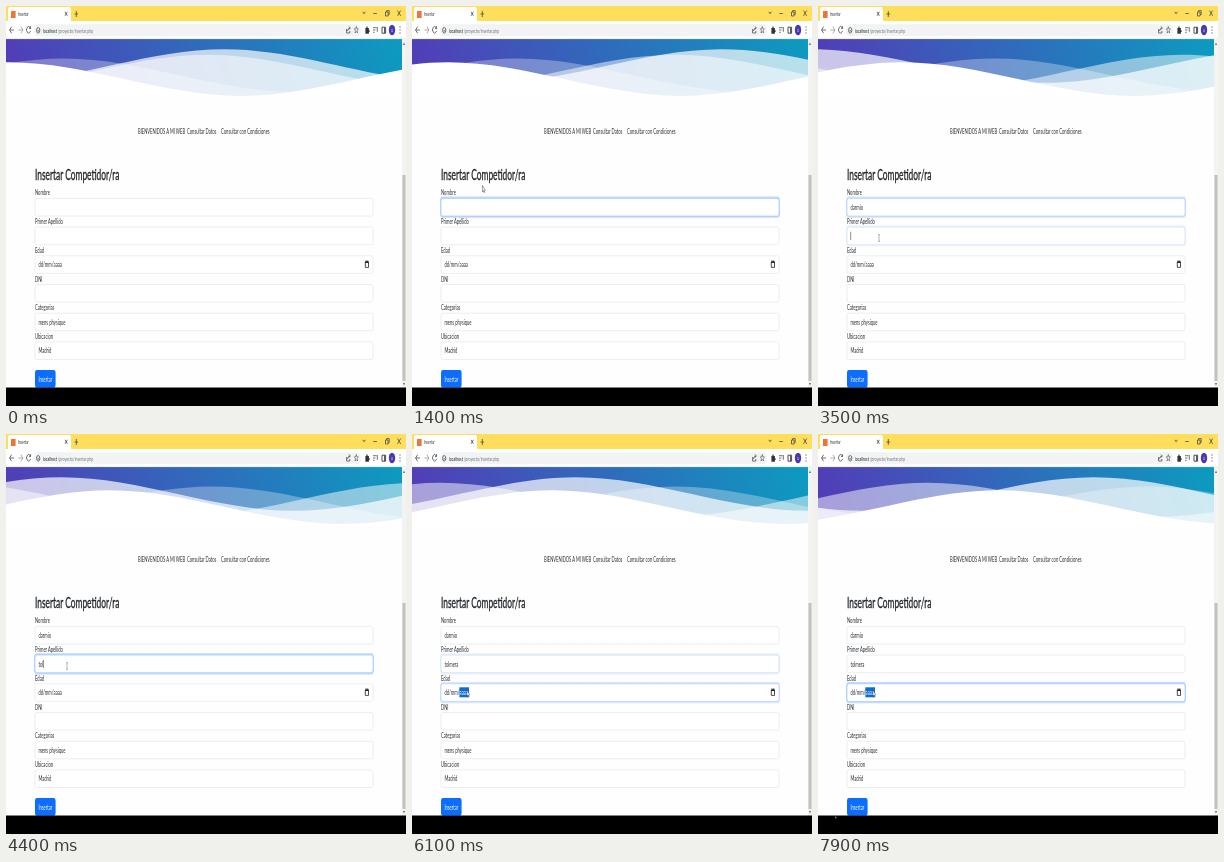
Write an HTML page that moves like this. It is 400 px wide and 400 px high and loops after 8000 ms.

```html
<!DOCTYPE html>
<html lang="es">
<head>
<meta charset="utf-8">
<title>Insertar</title>
<style>
  html, body { margin: 0; width: 100%; height: 100%; overflow: hidden; background: #fefefe; }
  #stage { display: block; width: 100vw; height: 100vh; }
  text { font-family: Lato, "Open Sans", sans-serif; white-space: pre; }
  .icon { fill: none; stroke: #4a4d51; stroke-width: .8; }
</style>
</head>
<body>
<svg id="stage" viewBox="0 0 400 400" preserveAspectRatio="none">
  <defs>
    <linearGradient id="sky" gradientUnits="userSpaceOnUse" x1="0" y1="126" x2="1401" y2="-683">
      <stop stop-color="#543ab7"/><stop offset="1" stop-color="#00acc1"/>
    </linearGradient>
    <path id="wave" d="M-160 44c30 0 58-18 88-18s58 18 88 18 58-18 88-18 58 18 88 18v44h-352z"/>
  </defs>
  <rect width="400" height="400" fill="#fefefe"/>

  <!-- header with waves -->
  <rect transform="translate(0 33) scale(.2604 .463)" width="1521" height="125" fill="url(#sky)"/>
  <svg x="0" y="39.5" width="396" height="52.3" viewBox="0 24 150 28" preserveAspectRatio="none" id="waves"></svg>

  <!-- browser bars -->
  <rect width="400" height="16" fill="#fede5b"/>
  <path d="M1 16q1 0 1-2V4q0-3 2-3h59q2 0 2 3v10q0 2 1 2z" fill="#fff"/>
  <rect y="15" width="400" height="18" fill="#fff"/>
  <rect x="28" y="18.2" width="327" height="12" rx="3.4" ry="6" fill="#f1f3f4"/>
  <path d="M0 32.7H400" stroke="#ddd" stroke-width=".5"/>
  <rect x="5" y="5" width="4.6" height="7" fill="#f0743a"/>
  <g class="icon">
    <path d="M59 5.8l2.4 4M61.4 5.8l-2.4 4M68.5 8h3.6M70.3 5v6M356.8 5.8l1.3 2 1.3-2M367.3 7.5h3.6M391.5 4.5l3.2 5.4M394.7 4.5l-3.2 5.4"/>
    <path d="M379.5 6h2.6v4h-2.6zM380.6 6v-1.4h2.6v4h-1"/>
    <path d="M8 24H3.6M5.6 20.7L3.6 24l2 3.3"/>
    <path d="M12.5 24h4.4M14.9 20.7l2 3.3-2 3.3" stroke="#999"/>
    <path d="M24.4 22.3a2 3.3 0 1 0 .1 2.6M24.6 20.2v2.4h-1.6"/>
    <ellipse cx="32.2" cy="24.3" rx="1.6" ry="2.8"/>
    <path d="M32.2 24v1.6" />
    <path d="M340.6 23v4h3.2v-2M341.5 25q.4-3 2.6-3M343 20.5l1.3 1.5-1.3 1.6"/>
    <path d="M350.3 20.5l.6 2.3h1.4l-1.1 1.7.4 2.5-1.3-1.4-1.3 1.4.4-2.5-1.1-1.7h1.4z" stroke-width=".6"/>
    <path d="M367 21.7h3.6M367 24h2.4M367 26.3h1.6M371.3 21v4.8"/>
    <path d="M376 21.2h3.6v6h-3.6zM378.6 21.2v6" stroke-width="1"/>
  </g>
  <path d="M359.4 22h1v-1.6h1.2V22h1.3v2.2h.7V26h-.7v1.7h-3.5z" fill="#333"/>
  <ellipse cx="386" cy="24" rx="3.2" ry="5.2" fill="#4b37b0"/>
  <g fill="#444"><ellipse cx="394" cy="21" rx=".5" ry=".8"/><ellipse cx="394" cy="24" rx=".5" ry=".8"/><ellipse cx="394" cy="27" rx=".5" ry=".8"/></g>

  <!-- scrollbar -->
  <rect x="396" y="33" width="4" height="349" fill="#f3f3f3"/>
  <rect x="396.5" y="169" width="3" height="206" fill="#c1c1c1"/>
  <path d="M397 39l1-2.4 1 2.4zM397 377l1 2.4 1-2.4z" fill="#666"/>

  <g id="form"></g>
  <rect x="29" y="364" width="20.6" height="17.7" rx="1.6" ry="2.8" fill="#0d6efd"/>
  <rect id="picked" x="47.4" y="253.3" width="9.6" height="10" fill="#0b6cd4"/>
  <g id="labels"></g>
  <g fill="none" stroke="#222" stroke-width=".8"><path d="M359.3 256h3.2v5.4h-3.2z"/><path d="M359.3 256.4h3.2M360 254.6v1.4M361.8 254.6v1.4" stroke-width="1.1"/></g>
  <path id="caret" d="M0-4.2V4.2" stroke="#222" stroke-width=".5"/>
  <rect y="381.5" width="400" height="18.5" fill="#000"/>
  <rect id="speck" x="17.3" y="382.7" width="1" height="1.6" fill="#bbb"/>
  <path id="arrow" d="M0 0v6.4l.9-1.2.7 2 .6-.4-.7-1.9h1.3z" fill="#fff" stroke="#222" stroke-width=".4"/>
  <path id="beam" d="M-.9-3.4H.9M0-3.4V3.4M-.9 3.4H.9" fill="none" stroke="#666" stroke-width=".5"/>
</svg>
<script>
const LOOP = 8000, SQUASH = 0.5625, PAGE_AGE = 187.9, STEP = 28.7;
const $ = id => document.getElementById(id);

function add(parent, tag, attrs) {
  const el = document.createElementNS('http://www.w3.org/2000/svg', tag);
  for (const k in attrs) el.setAttribute(k, attrs[k]);
  return parent.appendChild(el);
}
// The whole screen is a wide picture squeezed into a square.
function write(x, y, str, size = 7.4, fill = '#2b2f33', more = {}) {
  const el = add($('labels'), 'text', {
    transform: `translate(${x} ${y}) scale(${SQUASH} 1)`, 'font-size': size, fill, ...more });
  el.textContent = str;
  return el;
}
function put(el, x, y, shown) {
  el.setAttribute('transform', `translate(${x} ${y})`);
  el.style.opacity = shown ? 1 : 0;
}

write(12, 10.2, 'Insertar', 5.6);
write(37, 26.6, 'localhost', 6.3, '#222');
write(51.8, 26.6, '/proyecto/insertar.php', 6.3, '#70757a');
write(386, 25.7, 'u', 5, '#fff', { 'text-anchor': 'middle' });
write(132, 127.6, 'BIENVENIDOS A MI WEB', 7.3);
write(181, 127.6, 'Consultar Datos');
write(215, 127.6, 'Consultar con Condiciones');
write(29, 173.8, 'Insertar Competidor/ra', 14.9, '#212529', { stroke: '#212529', 'stroke-width': .35 });
write(39.3, 376, 'Insertar', 7.2, '#fff', { 'text-anchor': 'middle' });

const values = ['', '', 'dd/mm/', '', 'mens physique', 'Madrid'];
const fields = ['Nombre', 'Primer Apellido', 'Edad', 'DNI', 'Categorias', 'Ubicacion'].map((label, i) => {
  const y = 192.4 + i * STEP;
  const box = { x: 29, y, width: 338, height: 17.6, rx: 1.6, ry: 2.8 };
  write(29, y - 3, label);
  add($('form'), 'rect', { ...box, fill: '#fff', stroke: '#d3d8dd', 'stroke-width': .45 });
  const glow = add($('form'), 'g', {});
  add(glow, 'rect', { x: 28, y: y - 1.8, width: 340, height: 21.2, rx: 2.4, ry: 4.4, fill: '#c2dbff' });
  add(glow, 'rect', { ...box, fill: '#fff', stroke: '#86b7fe', 'stroke-width': .5 });
  return { y, glow, text: write(32.4, y + 11.4, values[i]) };
});
const year = write(47.6, fields[2].y + 11.4, 'aaaa');

const waves = [[7, 2, 0, .7], [10, 3, 3, .5], [13, 4, 5, .3], [20, 5, 7, 1]].map(([period, lead, y, alpha]) =>
  ({ period, lead, el: add($('waves'), 'use', { href: '#wave', y, fill: `rgba(255,255,255,${alpha})` }) }));

// Focus spans and typing times, in ms.
const focus = [[800, 3460], [3460, 6000], [6000, 9000]];
const typed = [
  ['darmio', [1900, 2050, 2180, 2400, 2550, 2700]],
  ['tolmera', [3900, 4100, 4300, 4500, 4700, 4950, 5150]]
];
const mouse = [[400, 90, 240], [800, 62, 202], [1200, 70.5, 179.5], [2800, 70.5, 179.5],
  [3300, 61, 232], [5450, 61, 232], [5950, 55, 256]];

const clamp = v => Math.max(0, Math.min(1, v));

function mouseAt(t) {
  let [, x, y] = mouse[0];
  for (let i = 1; i < mouse.length; i++) {
    const [a] = mouse[i - 1], [b, bx, by] = mouse[i];
    const k = clamp((t - a) / (b - a)), e = k * k * (3 - 2 * k);
    x += (bx - x) * e;
    y += (by - y) * e;
  }
  return [x, y];
}

function draw(t) {
  for (const w of waves) {
    const p = (PAGE_AGE + t / 1000 + w.lead) / w.period % 1;
    const eased = p - .0145 * Math.sin(2 * Math.PI * p);
    w.el.setAttribute('x', 48 - 90 + 175 * eased);
  }

  fields.forEach((f, i) => {
    const [on, off] = focus[i] || [1e9, 1e9];
    f.glow.style.opacity = clamp((t - on) / 150) - clamp((t - off) / 150);
  });

  let caretShown = false, caretX = 0, caretY = 0;
  typed.forEach(([word, times], i) => {
    const n = times.filter(k => k <= t).length, f = fields[i], [on, off] = focus[i];
    f.text.textContent = word.slice(0, n);
    if (t >= on && t < off) {
      const since = t - (n ? times[n - 1] : on);
      caretShown = since % 1000 < 500;
      caretX = 32.7 + (n ? f.text.getComputedTextLength() * SQUASH : 0);
      caretY = f.y + 8.8;
    }
  });
  put($('caret'), caretX, caretY, caretShown);

  const picked = t >= 6000;
  $('picked').style.opacity = picked ? 1 : 0;
  year.setAttribute('fill', picked ? '#fff' : '#2b2f33');
  $('speck').style.opacity = t >= 6400 ? 1 : 0;

  const [x, y] = mouseAt(t);
  const overText = fields.slice(0, 2).some(f => y > f.y && y < f.y + 17.6);
  put($('arrow'), x, y, t >= 400 && !overText);
  put($('beam'), x, y, t >= 400 && overText);
}

const start = performance.now();
function tick() {
  draw((performance.now() - start) % LOOP);
  requestAnimationFrame(tick);
}
tick();
</script>
</body>
</html>
```
